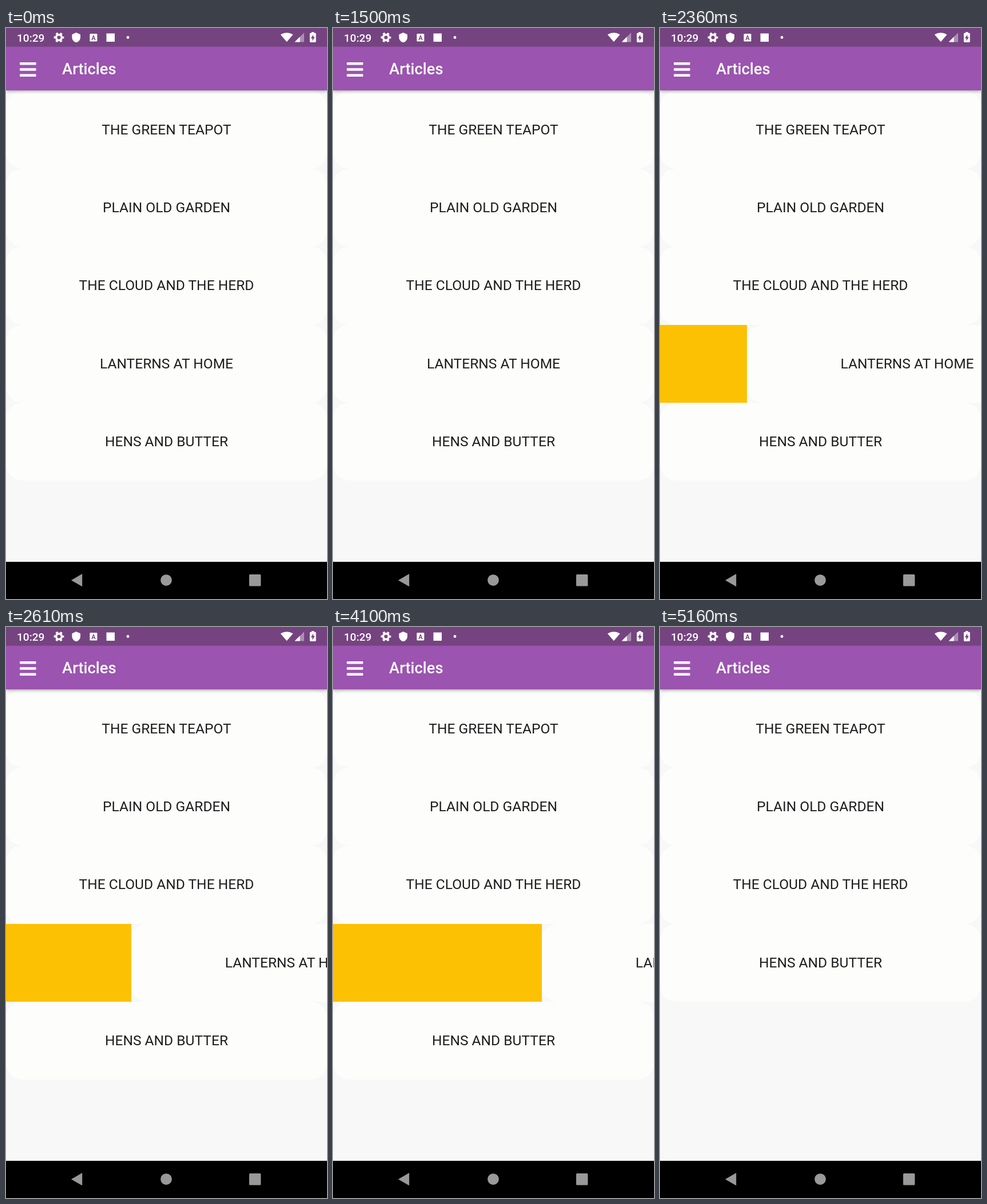
An HTML page that plays this animation: 561x998 px, repeating every 8000 ms.

```html
<!DOCTYPE html>
<html lang="en">
<head>
<meta charset="utf-8">
<title>Articles</title>
<style>
  html, body { margin: 0; width: 100%; height: 100%; overflow: hidden; }
  body { position: relative; background: #f8f8f9; font-family: Roboto, sans-serif; }
  #bar {
    position: absolute; z-index: 2; left: 0; top: 0; width: 561px; height: 109px;
    background: #9b54af; box-shadow: 0 2px 5px rgba(0, 0, 0, .3);
  }
  #bar svg, #nav svg { position: absolute; left: 0; top: 0; }
  #list { position: absolute; left: 0; top: 109.5px; width: 561px; }
  .row { position: relative; height: 136.4px; overflow: hidden; }
  .card {
    position: absolute; left: 0; top: 0; width: 561px; height: 136.4px;
    border-radius: 27px; background: #fdfdfc;
    box-shadow: 0 0 2px rgba(0, 0, 0, .03);
    color: #1d1d1d; font-size: 24.55px; line-height: 136.4px;
    text-align: center; white-space: nowrap;
  }
  .reveal { position: absolute; left: 0; top: 0; width: 0; height: 100%; background: #fcc103; }
  #nav { position: absolute; left: 0; top: 933px; width: 561px; height: 65px; background: #000; }
</style>
</head>
<body>
<div id="bar">
  <svg width="561" height="109" fill="#fff" font-family="Roboto, sans-serif" font-weight="500">
    <rect width="561" height="32.7" fill="#754480"/>
    <text x="19" y="24" font-size="19.1">10:29</text>

    <g fill="none" stroke="#fff">
      <circle cx="92.5" cy="16.5" r="4.9" stroke-width="3.6"/>
      <circle cx="92.5" cy="16.5" r="7.5" stroke-width="2.8" stroke-dasharray="3.8 4.05" stroke-dashoffset="1.9"/>
    </g>
    <path d="M122.7 8 130 11.2v5.2c0 4.2-3.1 7.8-7.3 8.9-4.2-1.1-7.3-4.7-7.3-8.9v-5.2z"/>
    <rect x="146.4" y="9.9" width="13" height="13.6" rx="1.3"/>
    <text x="152.9" y="20.6" font-size="11" font-weight="700" text-anchor="middle" fill="#754480">A</text>
    <rect x="175.5" y="9.5" width="14.5" height="14.5"/>
    <circle cx="213" cy="16.5" r="2.4"/>

    <path d="M490.7 24.2 479.8 11.6Q490.7 5 501.6 11.6z"/>
    <path d="M521 8.2V24.4H504.6z" opacity=".4"/>
    <path d="M513.6 15.5V24.4H504.6z"/>
    <path d="M534 8.7v-1.6h4.4v1.6h2q1.3 0 1.3 1.3v13.6q0 1.3-1.3 1.3h-8.2q-1.3 0-1.3-1.3V10q0-1.3 1.3-1.3z"/>
    <path d="M537.2 11.5v4.2h2.6l-4.4 7v-4.8h-2.6z" fill="#754480"/>

    <rect x="24" y="60" width="28.6" height="4.4" rx="1"/>
    <rect x="24" y="70.3" width="28.6" height="4.4" rx="1"/>
    <rect x="24" y="80.6" width="28.6" height="4.4" rx="1"/>
    <text x="98" y="81" font-size="27.3">Articles</text>
  </svg>
</div>

<div id="list"></div>

<div id="nav">
  <svg width="561" height="65" fill="#999">
    <path d="M114 32.2 133.2 21.1V43.3z"/>
    <circle cx="280" cy="32.1" r="9.9"/>
    <rect x="425" y="22" width="20.4" height="20.4" rx="1.5"/>
  </svg>
</div>

<script>
const LOOP = 8000, ROW = 136.4, WIDTH = 561, SWIPED = 3;
const titles = [
  'THE GREEN TEAPOT',
  'PLAIN OLD GARDEN',
  'THE CLOUD AND THE HERD',
  'LANTERNS AT HOME',
  'HENS AND BUTTER'
];

// time in ms, swipe distance in px
const drag = [
  [0, 0], [1720, 5], [1840, 17.5], [2020, 98.7], [2210, 128.5], [2360, 151.5],
  [2510, 185], [2610, 218.7], [3310, 295.5], [3490, 302], [3570, 308.5],
  [4100, 364.7], [4450, 430], [4950, WIDTH]
];
// time in ms, row height in px
const shrink = [[0, ROW], [5080, 62], [5160, 0]];

function add(parent, name, text = '') {
  const el = document.createElement('div');
  el.className = name;
  el.textContent = text;
  return parent.appendChild(el);
}

function play(el, steps, style) {
  const last = steps[steps.length - 1][1];
  const frames = [...steps, [LOOP, last]].map(([time, value]) => ({
    offset: time / LOOP, easing: 'step-end', ...style(value)
  }));
  const anim = el.animate(frames, { duration: LOOP, iterations: Infinity });
  anim.startTime = document.timeline.currentTime;
}

const list = document.getElementById('list');
titles.forEach((title, i) => {
  const row = add(list, 'row');
  const card = add(row, 'card', title);
  if (i !== SWIPED) return;
  const reveal = add(row, 'reveal');
  play(card, drag, x => ({ transform: `translateX(${x}px)` }));
  play(reveal, drag, x => ({ width: x + 'px' }));
  play(row, shrink, h => ({ height: h + 'px' }));
});
</script>
</body>
</html>
```
